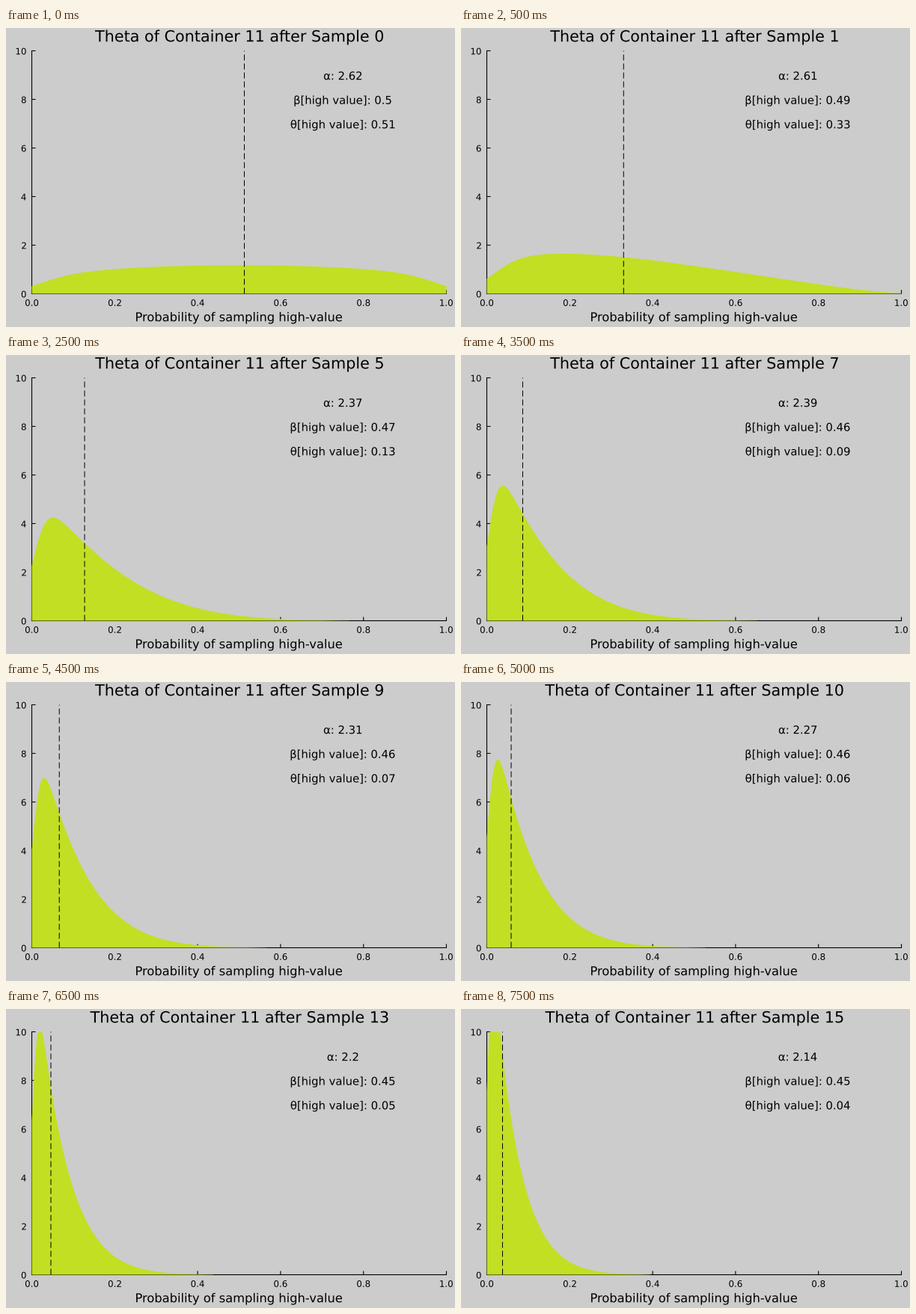
Recreate the animation shown at these times as a matplotlib script. Size 600 px wide and 400 px high, loop 8000 ms.

```python
import numpy as np
import matplotlib.pyplot as plt
from matplotlib.animation import FuncAnimation
from matplotlib.patches import PathPatch, Polygon
from matplotlib.path import Path
from matplotlib.textpath import TextPath

plt.rcParams.update({"font.family": "DejaVu Sans", "toolbar": "None"})

W, H, DPI = 600, 400, 100
PT = 72 / DPI                       # points per pixel
STEPS, STEP_MS = 16, 500
X0, X1, Y0, Y10 = 34.5, 588.5, 355.5, 30.5
BACK, FILL = "#cccccc", "#c2df23"

# Key estimates; the steps between them are interpolated.
KEYS = [0, 3, 5, 7, 10, 13, 15]
ALPHA = [2.62, 2.58, 2.37, 2.39, 2.27, 2.20, 2.14]
BETA = [.50, .47, .47, .46, .46, .45, .45]
THETA = [.5126, .1818, .1273, .0866, .0587, .0460, .0379]

GRID = (np.arange(1500) + .5) / 1500


def px(v):
    return X0 + (X1 - X0) * v


def py(v):
    return Y0 + (Y10 - Y0) * v / 10


class Posterior:
    """Beta posterior after `step` draws, none of them high-value."""

    def __init__(self, step):
        self.alpha = np.interp(step, KEYS, ALPHA)
        self.beta = np.interp(step, KEYS, BETA)
        a = self.alpha * self.beta
        b = self.alpha * (1 - self.beta) + step
        pdf = GRID ** (a - 1) * (1 - GRID) ** (b - 1)
        self.mass = pdf / pdf.sum()
        sd = np.sqrt(a * b / (a + b + 1)) / (a + b)
        self.width = .21 * sd       # kernel bandwidth

    def quantile(self, q):
        return np.interp(q, np.cumsum(self.mass), GRID)

    def density(self):
        """Gaussian kernel estimate, cut off at both ends of the axis."""
        end = min(1, self.quantile(.9995) + 2 * self.width)
        x = np.linspace(0, end, 400)
        z = (x[:, None] - GRID) / self.width
        y = np.exp(-z * z / 2) @ self.mass / (self.width * np.sqrt(2 * np.pi))
        return x, np.minimum(y, 10)


# Sampled medians stray a little from the exact ones.
STRAY = [t / Posterior(k).quantile(.5) for k, t in zip(KEYS, THETA)]

fig = plt.figure(figsize=(W / DPI, H / DPI), dpi=DPI, facecolor=BACK)
ax = fig.add_axes([0, 0, 1, 1])
ax.set(xlim=(0, W), ylim=(H, 0))
ax.axis("off")


def line(xs, ys, z=1, width=1.1, **kw):
    return ax.plot(xs, ys, color="black", lw=width * PT, zorder=z, snap=False,
                   solid_capstyle="butt", dash_capstyle="butt", **kw)[0]


class Label:
    """Outlined text on a baseline; align 0.5 is centred, 1 is right."""

    def __init__(self, x, y, size, text="", align=.5):
        self.x, self.y, self.size, self.align = x, y, size, align
        self.patch = ax.add_patch(PathPatch(Path([[0, 0]]), fc="black", lw=0,
                                            ec="none", zorder=5, snap=False))
        if text:
            self.set(text)

    def set(self, text):
        path = TextPath((0, 0), text, size=self.size)
        box = path.get_extents()
        left = self.x - box.x0 - self.align * box.width
        points = path.vertices * [1, -1] + [left, self.y]
        self.patch.set_path(Path(points, path.codes))


line([X0 - .5, X1 + .5], [Y0, Y0])
line([X0, X0], [Y0 + .5, Y10 - .5])
for i in range(6):
    x, y = px(i / 5), py(2 * i)
    line([x, x], [Y0, Y0 - 5])
    line([X0, X0 + 5], [y, y])
    Label(x, 371.8, 11.85, f"{i / 5:.1f}")
    Label(26.7, y + 4.9, 11.85, str(2 * i), align=1)
mid = px(.5)
Label(mid, 392.3, 16.3, "Probability of sampling high-value")

title = Label(mid, 18.2, 20.72)
notes = [Label(px(.75), py(v) + 6.2, 14.82) for v in (9, 8, 7)]
area = ax.add_patch(Polygon([[X0, Y0]] * 3, fc=FILL, ec="none", lw=0,
                            zorder=2, snap=False))
median = line([X0, X0], [Y0, Y10], 3, 1, linestyle=(0, (8, 4)))


def draw(step):
    post = Posterior(step)
    theta = post.quantile(.5) * np.interp(step, KEYS, STRAY)
    title.set(f"Theta of Container 11 after Sample {step}")
    notes[0].set(f"α: {round(float(post.alpha), 2)}")
    notes[1].set(f"β[high value]: {round(float(post.beta), 2)}")
    notes[2].set(f"θ[high value]: {round(float(theta), 2)}")
    x, y = post.density()
    top = np.column_stack([px(x), py(y)])
    area.set_xy(np.vstack([[X0, Y0], top, [px(x[-1]), Y0]]))
    median.set_xdata([px(theta)] * 2)
    return [area, median, title.patch, *(n.patch for n in notes)]


anim = FuncAnimation(fig, draw, frames=STEPS, interval=STEP_MS, repeat=True,
                     repeat_delay=0, blit=False)
plt.show()
```
